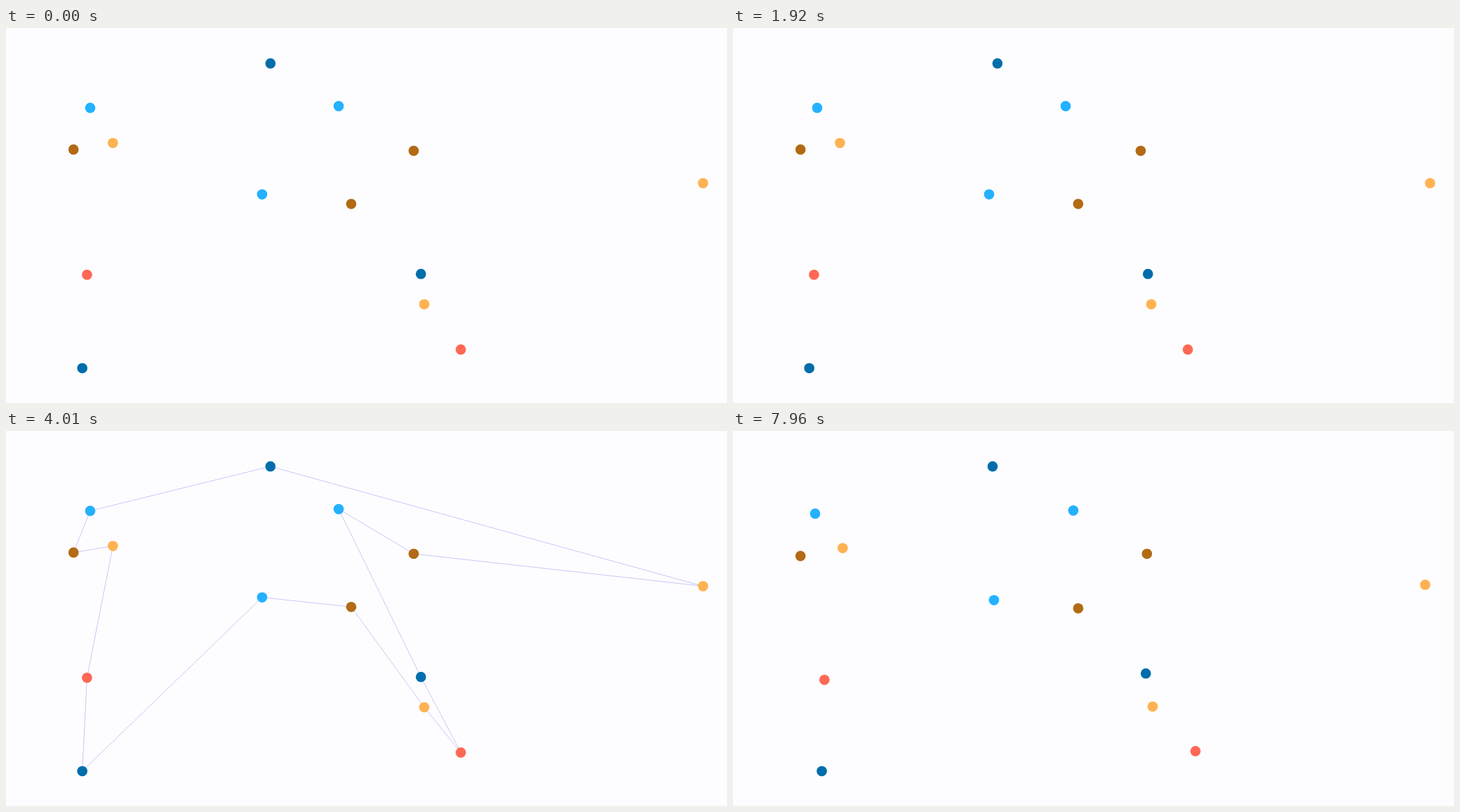
Recreate the animation shown at these times as an HTML page. Size 1036x540 px, loop 7990 ms.

```html
<!DOCTYPE html>
<html lang="en">
<head>
<meta charset="utf-8">
<title>Dot tour</title>
<style>
  html, body { margin: 0; width: 100%; height: 100%; overflow: hidden; background: #fdfdff; }
  svg { display: block; width: 100vw; height: 100vh; }
</style>
</head>
<body>
<svg id="stage" viewBox="0 0 1036 540"></svg>
<script>
const LOOP = 7990, DRAW = 490;
const BLINK_START = 1690, BLINKS = 6, FADE_OUT = 7460, DRIFT_START = 7700;
const COLORS = ['#006dab', '#24b1ff', '#b26a14', '#ffb252', '#ff6854'];

// Key points in tour order: x, y, and the drift at the end of the loop
const DOTS = [
  [380, 51, -7, 0], [121, 115, -3, 4], [97, 175, 0, 5], [153.6, 165.6, 4, 3],
  [116.4, 355.3, 15, 3], [109.6, 489.8, 18, 0], [368, 239.6, 7, 4],
  [496, 253.3, 0, 2], [601, 397.8, 2, -1], [653.5, 463, 11, -2],
  [596.2, 354.2, -3, -5], [478, 112.5, 11, 2], [585.8, 176.8, 9, 0],
  [1001.6, 223.4, -7, -2]
];

const stage = document.getElementById('stage');
const clamp = v => Math.max(0, Math.min(1, v));
const mix = (a, b, k) => a + (b - a) * k;

function add(tag, attrs) {
  const el = document.createElementNS('http://www.w3.org/2000/svg', tag);
  for (const name in attrs) el.setAttribute(name, attrs[name]);
  return stage.appendChild(el);
}

// cubic-bezier(.25, .1, .25, 1)
function ease(x) {
  if (x <= 0 || x >= 1) return clamp(x);
  const curve = (u, a, b) => 3 * u * (1 - u) ** 2 * a + 3 * u * u * (1 - u) * b + u ** 3;
  let lo = 0, hi = 1;
  for (let i = 0; i < 20; i++) {
    const mid = (lo + hi) / 2;
    if (curve(mid, 0.25, 0.25) < x) lo = mid; else hi = mid;
  }
  return curve(lo, 0.1, 1);
}

// Each line starts after the one before, with growing gaps
const lineStart = i => 50 + 40 * i + 0.1 * i ** 3;

// The lines blink twice a second, slowing slightly, and fade at the end
function strength(t) {
  let level = 1 - clamp((t - FADE_OUT) / 240);
  for (let i = 0; i < BLINKS; i++) {
    const start = BLINK_START + 500 * i + 1.5 * i ** 3;
    const change = clamp((t - start) / (220 + 25 * i));
    level += i % 2 ? change : -change;
  }
  return clamp(level);
}

const lines = DOTS.map(([x, y]) => add('line', { x1: x, y1: y, 'stroke-width': 1 }));
const dots = DOTS.map(([x, y], i) =>
  add('circle', { cx: x, cy: y, r: 7.4, fill: COLORS[i % COLORS.length] }));

function render(t) {
  const level = strength(t);
  const dark = clamp((level - 0.45) / 0.55);
  const stroke = `rgb(${mix(200, 156, dark)}, ${mix(197, 154, dark)}, ${mix(247, 152, dark)})`;
  const drift = clamp((t - DRIFT_START) / 260) ** 2;

  lines.forEach((line, i) => {
    const [x1, y1] = DOTS[i];
    const [x2, y2] = DOTS[(i + 1) % DOTS.length];
    const k = ease((t - lineStart(i)) / DRAW);
    line.setAttribute('x2', mix(x1, x2, k));
    line.setAttribute('y2', mix(y1, y2, k));
    line.setAttribute('stroke', stroke);
    line.setAttribute('opacity', k > 0 ? clamp(level / 0.3) : 0);
  });

  dots.forEach((dot, i) => {
    const [x, y, dx, dy] = DOTS[i];
    dot.setAttribute('cx', x + dx * drift);
    dot.setAttribute('cy', y + dy * drift);
  });
}

function tick() {
  render(performance.now() % LOOP);
  requestAnimationFrame(tick);
}
tick();
</script>
</body>
</html>
```
